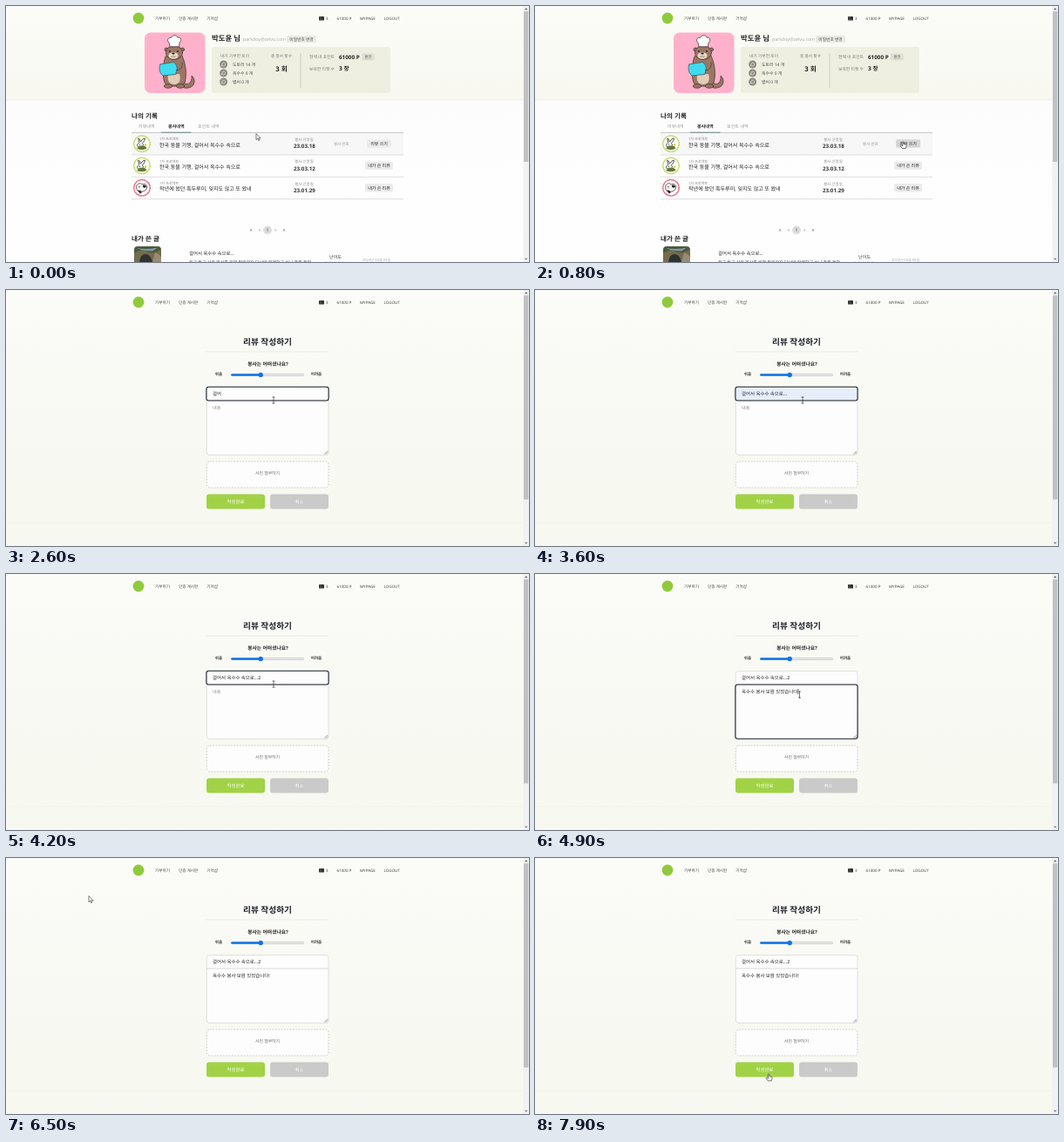
Animation of 600x294 px, one loop 8000 ms. Source, as an HTML page:

```html
<!DOCTYPE html>
<html lang="ko">
<head>
<meta charset="utf-8">
<title>리뷰 작성</title>
<style>
html, body { margin: 0; width: 100%; height: 100%; overflow: hidden; background: #fff; }
svg { display: block; width: 600px; height: 294px; }
text { font-family: "Noto Sans", "Noto Sans CJK KR", "Noto Sans CJK", sans-serif; text-rendering: geometricPrecision; white-space: pre; }
</style>
</head>
<body>
<svg id="stage" viewBox="0 0 600 294" xmlns="http://www.w3.org/2000/svg"></svg>
<script>
const stage = document.getElementById('stage');

// ---- markup helpers ----
const text = (x, y, str, size, fill = '#333', weight = 400, anchor = 'start', id = '') =>
  `<text x="${x}" y="${y}" font-size="${size}" fill="${fill}" font-weight="${weight}" text-anchor="${anchor}"${id && ` id="${id}"`}>${str}</text>`;
const mid = (x, y, str, size, fill, weight) => text(x, y, str, size, fill, weight, 'middle');
const rect = (x, y, w, h, fill, r = 0, extra = '') =>
  `<rect x="${x}" y="${y}" width="${w}" height="${h}" rx="${r}" fill="${fill}" ${extra}/>`;
const circle = (x, y, r, fill, extra = '') => `<circle cx="${x}" cy="${y}" r="${r}" fill="${fill}" ${extra}/>`;
const path = (d, fill, extra = '') => `<path d="${d}" fill="${fill}" ${extra}/>`;
const line = (x1, y1, x2, y2, color, w = .6) =>
  `<path d="M${x1} ${y1}L${x2} ${y2}" stroke="${color}" stroke-width="${w}"/>`;
const ink = (color, w) => `stroke="${color}" stroke-width="${w}" stroke-linejoin="round" stroke-linecap="round"`;

const header = () =>
  circle(152, 14, 6.4, '#8fca3c') +
  text(171, 15.6, '기부하기', 4.65, '#444') +
  text(198, 15.6, '인증 게시판', 4.6, '#444') +
  text(230.3, 15.6, '기억샵', 4.65, '#444') +
  rect(359, 12, 6, 4.4, '#333', .4) + line(361, 12, 361, 16.4, '#999', .4) +
  text(367, 15.6, '3', 4.5, '#444') +
  text(379.6, 15.6, '61000 P', 4.5, '#444') +
  text(406, 15.6, 'MYPAGE', 4.5, '#444') +
  text(433.4, 15.6, 'LOGOUT', 4.5, '#444');

const scrollbar = end =>
  rect(593.4, 0, 6.6, 294, '#f1f1f1') + rect(594, 6.2, 5.3, end - 6.2, '#c1c1c1') +
  path('M595 4.2h3.4l-1.7-2z', '#555') + path('M595 289.8h3.4l-1.7 2z', '#777');

const otter = () => {
  const o = ink('#4a3a36', .8);
  return rect(159, 30.5, 69.5, 69.5, '#ffb1cb', 7) +
    path('M204 88C209 92 214 88 213 80C218 84 217 93 209 94C205 95 202 93 202 92Z', '#9a7765', o) +
    path('M183 58C180 66 179 80 182 88C183 93 202 94 205 88C208 78 206 66 202 57Z', '#9a7765', o) +
    path('M186 79C185 86 187 90 193 90C199 90 201 85 199 78Z', '#e2cdb8') +
    `<ellipse cx="186" cy="92" rx="4.6" ry="2.2" fill="#9a7765" ${o}/><ellipse cx="200" cy="92" rx="4.6" ry="2.2" fill="#9a7765" ${o}/>` +
    circle(184, 50, 2, '#9a7765', o) + circle(202.5, 50, 2, '#9a7765', o) +
    `<ellipse cx="193" cy="53.5" rx="9.6" ry="8" fill="#9a7765" ${o}/><ellipse cx="192" cy="57" rx="5.6" ry="3.8" fill="#ead9c6"/>` +
    circle(188, 52, .9, '#222') + circle(197, 52, .9, '#222') +
    `<ellipse cx="192" cy="54.6" rx="1.7" ry="1.1" fill="#222"/>` +
    path('M189.6 58q1.2 1.2 2.4-.6q1.2 1.8 2.4.6', 'none', ink('#333', .5)) +
    path('M188 46.5L187 42C184 40 186 35.5 189.5 36.5C191 32.8 196 33 197 36.2C201 35.5 202 40 199 42L198.6 46.5Z', '#fff', o) +
    path('M177 67L192 64.5C195 66 197 70 196 74L194.5 78.5L180 80C176 77 175 71 177 67Z', '#3fdcf0', ink('#34545c', .7)) +
    path('M202 65C203 70 200 74 195.5 73.5', 'none', o);
};

const badge = (y, ring, body) =>
  circle(156, y, 9.2, '#fdfdfb', `stroke="${ring}" stroke-width="1.5" stroke-dasharray="1.6 .35"`) + body;
const rabbit = y =>
  path(`M152 ${y - 6}q2 0 2.5 4q3-5 5-4q0 3-3 5.500q2 2 0 4q-5 2-6-1q0-2 2-3.500z`, '#f4f4ee', ink('#333', .8)) +
  path(`M150.500 ${y + 6}q1-4 5-3.500q5-.5 6 3q-5 3-11 .5z`, '#5f7a3a') + circle(153.4, y + 1, .6, '#222') + circle(160, y + 1.5, 1.3, '#e8c33c');
const crane = y =>
  path(`M150 ${y - 3}q3-4 6-1q4-2 6 2q0 5-4 6q-6 2-8-2z`, '#f6f3f4', ink('#333', .7)) +
  path(`M157 ${y - 3}q4-1 4 2q-2 2-4 0z M151 ${y + 3}q3-1 5 2l-2 2z`, '#2b2b2b') + circle(153, y - 1, .7, '#222');

const row = (y, title, date, button, x, w, id = '') =>
  text(176, y - 3.6, '1차 프로젝트', 4.1, '#888') +
  text(176, y + 3.7, title, 6.05, '#222') +
  mid(342, y - 3, '봉사 신청일', 4.4, '#888') +
  mid(342.4, y + 5.2, date, 6.2, '#333', 600) +
  rect(x, y - 4.7, w, 9.4, '#ebebeb', 1.8, id && `id="${id}"`) +
  mid(x + w / 2, y + 1.8, button, 5, '#222', 500) +
  line(144, y + 13, 456, y + 13, '#c9c9c9', .6);

const toy = (y, label) => circle(249.6, y, 4.5, '#8f8c83') +
  path(`M247.600 ${y + 1.5}q0-3.500 2.500-3.600q2 1.500 1.200 3.400q-1.500 1.600-3.700.2z`, 'none', ink('#f3f2e8', .6)) +
  text(260, y + 2, label, 4.85, '#444');

const home = () =>
  rect(0, 0, 600, 294, 'url(#white)') + rect(0, 0, 600, 108, 'url(#cream)') + line(0, 108, 600, 108, '#e6e6df', .6) +
  header() + otter() +
  text(236, 40, '박도윤 님', 8.4, '#222', 600) +
  text(272, 39.8, 'parkdoy@zelvu.com', 5.2, '#aaa') +
  rect(322, 34, 34, 8, '#e9e9e2', 1.5) + mid(339, 39.7, '비밀번호 변경', 4.75, '#555') +
  rect(236, 47, 205, 53, '#efefe1', 3) +
  text(246, 58.6, '내가 기부한 토이', 4.75, '#777') +
  toy(67, '도토리 14 개') + toy(77, '옥수수 0 개') + toy(87, '볍씨 0 개') +
  mid(316, 58.6, '총 봉사 횟수', 4.7, '#777') + mid(316, 74.6, '3 회', 7.7, '#222', 600) +
  line(338, 54, 338, 94, '#bdbdb4', .7) +
  text(348, 60.4, '현재 내 포인트', 4.8, '#777') + text(382, 60.8, '61000 P', 6.3, '#222', 600) +
  rect(408, 54.6, 15, 8, '#e0dfd3', 1.5) + mid(415.5, 60.2, '환전', 4.4, '#555') +
  text(348, 74, '보유한 티켓 수', 4.8, '#777') + text(382, 74.4, '3 장', 6.6, '#222', 600) +
  text(144, 128.8, '나의 기록', 7.6, '#222', 700) +
  text(152, 139.8, '리뷰내역', 5.05, '#999') + text(186, 139.8, '봉사내역', 5.1, '#222', 700) +
  text(220, 139.8, '포인트 내역', 5.1, '#999') +
  rect(144, 146, 312, 25, '#f7f7f7') + line(144, 145.5, 456, 145.5, '#bcbcbc', .8) + line(178, 145.2, 212.5, 145.2, '#6f8584', 1) +
  row(158, '한국 동물 기행, 걸어서 옥수수 속으로', '23.03.18', '리뷰 쓰기', 414, 28, 'write') +
  row(183.3, '한국 동물 기행, 걸어서 옥수수 속으로', '23.03.12', '내가 쓴 리뷰', 412, 32) +
  row(208.7, '작년에 왔던 흑두루미, 잊지도 않고 또 왔네', '23.01.29', '내가 쓴 리뷰', 412, 32) +
  text(376, 159.8, '봉사 완료', 4.5, '#999') +
  badge(158.2, '#bfd556', rabbit(158)) + badge(183.4, '#bfd556', rabbit(183.2)) + badge(208.8, '#e0597f', crane(208.8)) +
  circle(300, 257.4, 4.9, '#dcdcdc') + mid(300, 259.200, '1', 5, '#333') +
  [[281, '«'], [291, '‹'], [309.3, '›'], [319, '»']].map(([x, s]) => mid(x, 259.2, s, 6, '#666')).join('') +
  text(144, 270, '내가 쓴 글', 7.6, '#222', 700) +
  rect(147, 276, 31, 30, '#4b5a3c', 4) + path('M147 284q8-6 15-2t16-3v15h-31z', '#756c4c') +
  path('M153 294q1-9 7-9t8 9z', '#2d3430') + path('M168 294l3-11q5 2 7 5v6z', '#9a8a72') + path('M150 277.500q9 3 24 0l-6 4-12-1z', '#7e9bb0') +
  text(210, 286.2, '걸어서 옥수수 속으로...', 5.4, '#222', 500) +
  text(210, 296, '최근 들고 사라 봉사를 위해 멀리까지 다녀와 함께하고 보니 푸른 들판', 4.95, '#555') +
  mid(378, 289.6, '난이도', 5.1, '#333', 500) + mid(377, 296.5, '★★★★★', 5, '#8d8d6b') +
  text(409, 293.4, '2023년 04월 05일', 4.1, '#aaa') +
  scrollbar(179);

const form = () =>
  rect(0, 0, 600, 294, 'url(#cream2)') + line(0, 267, 593, 267, '#f0f1e9', .7) + header() +
  mid(300, 63.3, '리뷰 작성하기', 9.7, '#1c1f2a', 600) + line(230, 71, 370, 71, '#e1e2da', .7) +
  mid(300.5, 87.300, '봉사는 어떠셨나요?', 5.75, '#222', 600) +
  mid(244, 97.6, '쉬움', 4.5, '#333', 600) + mid(356, 97.6, '어려움', 4.5, '#333', 600) +
  rect(258.4, 96.5, 83.2, 2, '#efefef', 1, 'stroke="#a9a9a9" stroke-width=".5"') +
  rect(258.2, 96.3, 0, 2.4, '#1273e6', 1.2, 'id="fill"') + circle(261, 97.5, 2.7, '#1273e6', 'id="thumb"') +
  path('M230.3 127V114.500q0-3 3-3H367q3 0 3 3V127Z', '#fdfdfd', 'id="field" stroke="#d8d9d4" stroke-width=".7"') +
  path('M230.3 127H370V186.500q0 3-3 3H233.300q-3 0-3-3Z', '#fdfdfd', 'stroke="#d4d5d0" stroke-width=".7"') +
  path('M365.500 188.300l3.300-3.300M367.300 188.300l1.500-1.500', 'none', ink('#666', .6)) +
  rect(229.9, 111.2, 140.2, 15.8, 'none', 2.5, 'id="ringTitle" stroke="#1d2430" stroke-width="1.1"') +
  rect(229.9, 127, 140.2, 62.2, 'none', 2.5, 'id="ringBody" stroke="#1d2430" stroke-width="1.1"') +
  text(237, 121.2, '', 5.45, '#222', 400, 'start', 'title') +
  text(237, 136.8, '', 5.45, '#222', 400, 'start', 'body') +
  rect(0, 132, .6, 6.2, '#111', 0, 'id="caret"') +
  rect(230.3, 197, 139.7, 30, '#fdfdfd', 3.5, 'stroke="#c6c7c3" stroke-width=".8" stroke-dasharray="2 1.4"') +
  mid(300, 211.800, '사진 첨부하기', 4.85, '#666') +
  rect(230, 234.4, 67, 17.2, '#a1d246', 3) + mid(263.5, 244.9, '작성완료', 5.4, '#fff', 500) +
  rect(303, 234.4, 67, 17.2, '#cacaca', 3) + mid(336.5, 244.9, '취소', 5.1, '#fff') +
  scrollbar(240.5);

const gradient = (id, ...stops) => `<linearGradient id="${id}" x2="0" y2="1">` +
  stops.map((c, i) => `<stop offset="${i / (stops.length - 1)}" stop-color="${c}"/>`).join('') + '</linearGradient>';

stage.innerHTML = '<defs>' + gradient('cream', '#fbfcf8', '#f8f8f0') + gradient('cream2', '#fbfcf8', '#f8f9f2', '#f7f8f0') +
  gradient('white', '#fbfbfb', '#fdfdfd', '#fefefe') + '</defs>' +
  `<g id="home">${home()}</g><g id="form">${form()}</g>` +
  '<g id="arrow">' + path('M0 0V6.600L1.600 5.200L2.700 7.600L3.700 7.100L2.700 4.800H4.800Z', '#fff', ink('#222', .6)) + '</g>' +
  '<g id="hand">' + path('M-.7.6Q0-.4.7.6V3L3.600 3.600Q4.200 4 4 5L3.300 8H-.9L-2.800 4.800Q-2.600 3.800-1.600 4.400L-.7 5.200Z', '#fff', ink('#222', .6)) + '</g>' +
  '<g id="beam">' + path('M-1.100-3.500H1.100M0-3.500V3.500M-1.100 3.500H1.100', 'none', ink('#222', .6)) + '</g>';

const el = Object.fromEntries([...stage.querySelectorAll('[id]')].map(n => [n.id, n]));
const show = (id, on) => el[id].setAttribute('visibility', on ? 'visible' : 'hidden');
const set = (id, attrs) => { for (const k in attrs) el[id].setAttribute(k, attrs[k]); };

// ---- pointer ----
const moves = [
  [0, 287, 147], [100, 288, 147], [700, 422, 155.500], [800, 422, 155.500], [900, 419, 154.5], [1000, 419, 154.5],
  [1500, 294, 98.300], [1900, 294, 98.300], [2300, 307, 126.5], [4200, 307, 126.5], [4600, 303.5, 138.5],
  [5700, 303.5, 138.5], [6200, 69, 52], [6500, 95, 44], [6600, 97, 38.500], [7200, 305, 150],
  [7500, 297, 193], [7800, 268, 247.8], [8000, 268, 247.8]
];
const ease = k => k * k * (3 - 2 * k);
function pointerAt(t) {
  const i = moves.findIndex(m => m[0] > t) - 1;
  const [t0, x0, y0] = moves[i], [t1, x1, y1] = moves[i + 1];
  const k = ease((t - t0) / (t1 - t0));
  return [x0 + (x1 - x0) * k, y0 + (y1 - y0) * k];
}
const inside = (x, y, l, t, r, b) => x >= l && x <= r && y >= t && y <= b;
function pointerKind(x, y, onForm) {
  if (!onForm) return inside(x, y, 412, 153, 444, 163) ? 'hand' : 'arrow';
  if (inside(x, y, 230, 111, 370, 189)) return 'beam';
  const hot = inside(x, y, 258, 95, 342, 100) || inside(x, y, 230, 197, 370, 227) || inside(x, y, 230, 234, 297, 252);
  return hot ? 'hand' : 'arrow';
}

// ---- form values ----
const TITLE = '걸어서 옥수수 속으로...', BODY = '옥수수 봉사 보람 있었습니다';
const typed = (str, t, from, to) => str.slice(0, Math.round(str.length * Math.min(1, Math.max(0, (t - from) / (to - from)))));
function titleAt(t) {
  if (t < 3200) return typed('걸어서', t, 2400, 2800);
  return TITLE + (t >= 4000 ? '2' : '');
}
const bodyAt = t => typed(BODY, t, 4300, 4800) + (t >= 5000 ? '!' : '');
function value(id, str, hint) {
  el[id].textContent = str || hint;
  set(id, { fill: str ? '#222' : '#8a8a8a', 'font-size': str ? 5.45 : 5.1 });
}

function render(time) {
  const t = Math.floor(time % 8000 / 100) * 100;
  const onForm = t >= 900;
  show('home', !onForm);
  el.form.style.display = onForm ? '' : 'none';

  const [x, y] = pointerAt(t), kind = pointerKind(x, y, onForm);
  for (const id of ['arrow', 'hand', 'beam']) show(id, id === kind);
  set(kind, { transform: `translate(${x.toFixed(2)} ${y.toFixed(2)})` });
  set('write', { fill: kind === 'hand' ? '#d6d6d6' : '#ebebeb' });
  if (!onForm) return;

  const thumb = t >= 1700 ? 292.2 : 261;
  set('thumb', { cx: thumb });
  set('fill', { width: thumb - 258.2 });

  const focusBody = t >= 4300 && t < 5500;
  el.ringTitle.style.display = t >= 2300 && t < 4300 ? '' : 'none';
  el.ringBody.style.display = focusBody ? '' : 'none';
  set('field', { fill: t >= 3200 && t < 4000 ? '#e6eefb' : '#fdfdfd' });
  value('title', titleAt(t), '제목');
  value('body', bodyAt(t), '내용');
  el.caret.style.display = focusBody ? '' : 'none';
  if (focusBody) set('caret', { x: 237.3 + (bodyAt(t) ? el.body.getComputedTextLength() : 0) });
}

const start = performance.now();
function tick() {
  render(performance.now() - start);
  requestAnimationFrame(tick);
}
tick();
</script>
</body>
</html>
```
